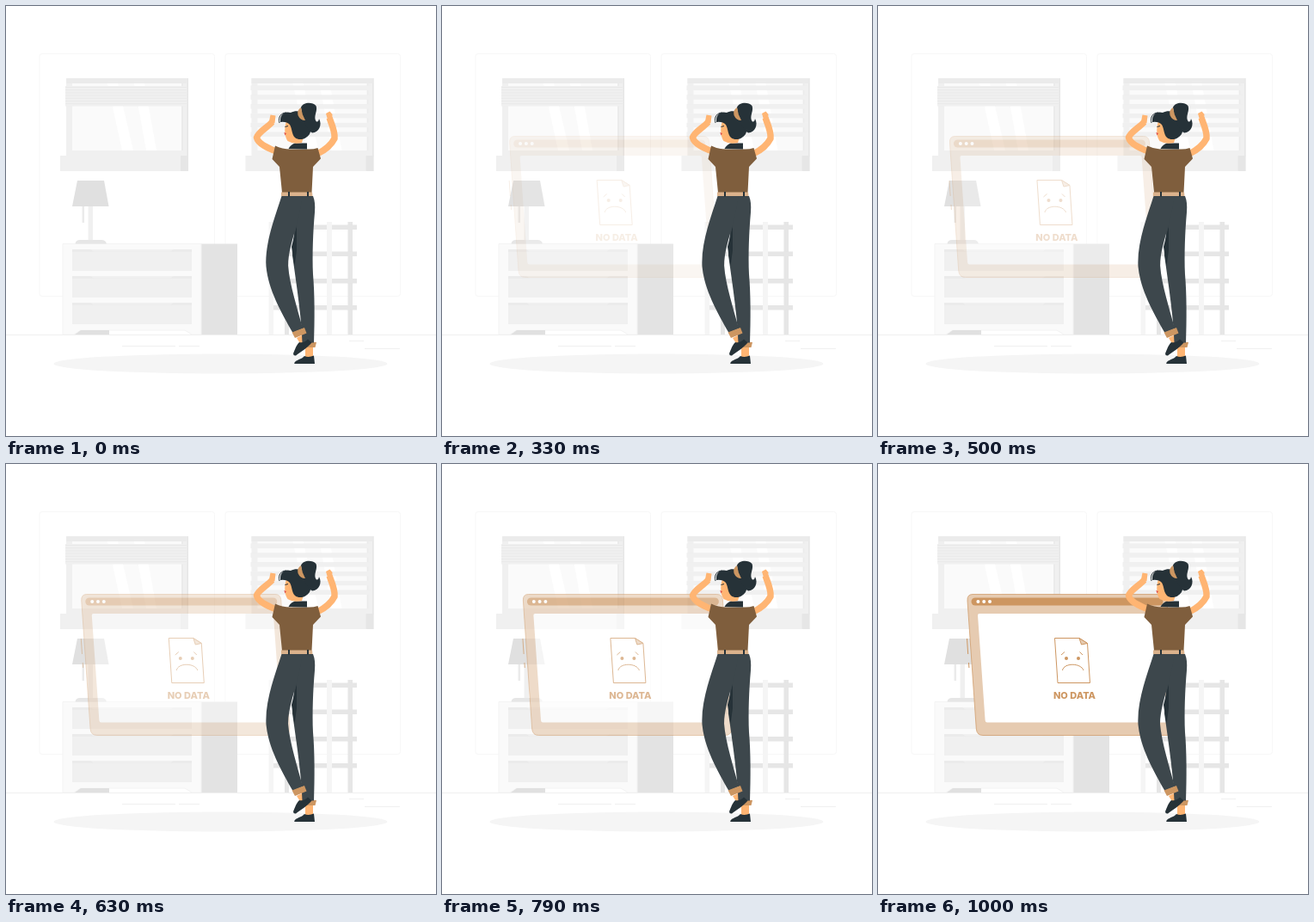
An HTML page that plays this animation: 500 px wide and 500 px high, repeating every 1040 ms.

```html
<!DOCTYPE html>
<html lang="en">
<head>
<meta charset="utf-8">
<title>No data</title>
<style>
  html, body { margin: 0; width: 100%; height: 100%; overflow: hidden; background: #fff; }
  svg { display: block; width: 100vw; height: 100vh; }
  .label { font: 800 11px Inter, "DejaVu Sans", sans-serif; }
</style>
</head>
<body>
<svg viewBox="0 0 500 500">
  <defs>
    <g id="window">
      <path fill="#f0f0f0" d="M70 84H212V192H70z"/>
      <path fill="#e6e6e6" d="M210.500 84H212V175H210.500z"/>
      <path fill="#ebebeb" d="M70 84H211V90H70zM204 90H206V168H204z"/>
      <path fill="#fafafa" d="M77 90H204V168H77z"/>
      <path fill="#fff" d="M118 90H130L148 168H135zM149 90H161L175 168H163z"/>
      <path fill="#f0f0f0" d="M63 174H203V192H63z"/>
      <path fill="#e6e6e6" d="M203 174H212V192H203z"/>
    </g>
    <g id="drawer">
      <path fill="#f0f0f0" d="M77 283H216V308H77z"/>
      <path fill="#ebebeb" d="M77 283H98L102 285.500H191L195 283H216V286H77z"/>
    </g>
  </defs>

  <g fill="none" stroke="#f7f7f7">
    <rect x="39" y="55.500" width="203.500" height="282" rx="3"/>
    <rect x="255" y="55.500" width="203.500" height="282" rx="3"/>
    <path stroke="#f0f0f0" d="M0 382.500H500M135 395.500H197M201 395.500H225M399 389.500H416M417 398.500H458"/>
  </g>

  <use href="#window"/>
  <use href="#window" x="215.500"/>
  <g id="blinds"></g>

  <g id="shelf">
    <path fill="#e6e6e6" d="M397.500 251H403V382H397.500zM324 251H329V382H324z"/>
    <path fill="#e6e6e6" d="M306 254.500H408V260H306zM306 285.500H408V291H306zM306 317H408V322.500H306zM306 348H408V353.500H306z"/>
    <path fill="#f5f5f5" d="M373 251H379V382H373zM305.500 251H311V382H305.500z"/>
  </g>

  <g id="dresser">
    <path fill="#e3e3e3" d="M227 276.500H269V382H227z"/>
    <path fill="#fafafa" stroke="#f3f3f3" d="M66 276.500H227V382H216L208 377H87L79 382H66z"/>
    <path fill="#e0e0e0" d="M80 382L87 377H120V382z"/>
    <use href="#drawer"/>
    <use href="#drawer" y="31"/>
    <use href="#drawer" y="62"/>
  </g>

  <g id="lamp">
    <path fill="#f0f0f0" d="M95.500 232H101V274H95.500z"/>
    <path fill="#ebebeb" d="M88.500 232H91V252H88.500z"/>
    <path fill="#e0e0e0" d="M83 203H114L119.500 233H77z"/>
    <path fill="#e6e6e6" d="M80.500 276.500Q81 272 86 272H111Q116 272 117 276.500z"/>
  </g>

  <ellipse cx="249.500" cy="416" rx="194" ry="11.500" fill="#f5f5f5"/>

  <g id="screen" fill="none" stroke="#cd9661">
    <path fill="#e6cbb1" stroke-width=".7" d="M110 151.500H329Q335.500 151.500 336 158L346 307Q346.500 315.500 339 315.500H122Q115 315.500 114.300 308L104 159Q103.500 151.500 110 151.500z"/>
    <path fill="#fff" stroke="none" d="M118 174H325Q327 174 327.200 176L336 298Q336 300.500 334 300.500H127Q124.800 300.500 124.600 298L116 176Q115.800 174 118 174z"/>
    <rect x="108.500" y="155.500" width="223" height="9" rx="4.500" fill="#cd9661" stroke="none"/>
    <g fill="#fff" stroke="none">
      <circle cx="116.400" cy="160" r="2"/>
      <circle cx="123.200" cy="160" r="2"/>
      <circle cx="130" cy="160" r="2"/>
    </g>
    <path d="M103.500 203L104.700 221M105.500 231L105.900 237"/>
    <path d="M205.500 202.500H234L243.500 208.500L246.500 254.500H209z"/>
    <path fill="#e6cbb1" d="M234 202.500L236.500 210L243.500 208.500z"/>
    <path d="M213 222L217 218.500M234.500 218.500L238 222M214.500 240C216 231 236 231 239 240"/>
    <g fill="#cd9661" stroke="none">
      <circle cx="219" cy="226" r="2"/>
      <circle cx="233" cy="226" r="2"/>
      <text class="label" x="228.500" y="272.800" text-anchor="middle">NO DATA</text>
    </g>
  </g>

  <g id="woman">
    <!-- legs and shoes -->
    <path fill="#ffb573" d="M348 396H357V409H348zM338 386L346 382L350 390L343 394z"/>
    <path fill="#cd9661" d="M345 390L361 391L359.500 397H347z"/>
    <path fill="#263238" d="M335 415.500C337 411 344 411 347 407Q352 409 358 406.500L359 416H336z"/>
    <path fill="#3d474c" d="M338 221H357Q360 228 359 240C357 262 356 290 357 312C359 335 359 365 358 391.500H344.500C344 365 338 325 333 290z"/>
    <path fill="#263238" d="M338 256L332 280L335.500 303L338 284z"/>
    <path fill="#3d474c" d="M320.500 221H345L339 252C333 271 328 288 328 302C330 325 339 352 345 375L333.500 380C320 356 305 330 302.500 303C301 275 313 245 320.500 221z"/>
    <path fill="#cd9661" d="M332.500 379.500L347 374L349.500 380.500L336 386z"/>
    <path fill="#263238" d="M334 404C336 400 337 395 341 391Q347 392 351 387.500L355.500 391.500C351 397 343 402 337 406.500Q334 407 334 404z"/>

    <!-- arms -->
    <g fill="none" stroke="#ffb573" stroke-width="7.500" stroke-linejoin="round">
      <path d="M309.500 135C303 142 293 147 291.500 153C293 160 304 165 314 169"/>
      <path d="M376 130C379 138 383 147 382 154C378 162 370 168 362 172"/>
    </g>
    <path fill="#ffb573" d="M307.500 126.500L313.500 127.500L312.500 136L307 139L306 134zM372 125L376.500 122.500L379.500 126L379 134L374.500 134z"/>

    <!-- torso -->
    <path fill="#7f5e3d" d="M313 162.500Q321 166.500 331 166.500H350Q357 167 362.500 165L366 177.500L357 187L355.500 217H321L318 187L309.500 178z"/>
    <path fill="#dbb28c" d="M320 216.500H356L356.500 221H320z"/>
    <path fill="#263238" d="M328 216H330V221.500H328zM350 216H352V221.500H350z"/>

    <!-- head -->
    <path fill="#263238" d="M328.500 166Q331 161 336 159.500H350V166.500z"/>
    <path fill="#ffb573" d="M326 134C323 143 324 152 327.500 157Q334 161 344 159L350 140L338 130z"/>
    <path fill="#e04f4a" d="M323.300 147L326 148L324.500 150.500z"/>
    <path fill="none" stroke="#263238" d="M324.500 140.500L328 139.500M318 136C316 129 320 124 326 124"/>
    <path fill="#263238" d="M319 133C319 125 325 122 331 124C337 121 343 122 346 126C354 130 358 139 353 149C349 155 341 157 336 153C332 149 333 143 330 138Q326 134 319 135z"/>
    <path fill="#263238" d="M343 118C345 112 356 111 360.500 116C363 122 357 128 360.500 134Q363 136 364 131C368 138 364 147 356 147.500C350 145 345 132 343 118z"/>
    <path fill="#cd9661" d="M343 118Q338 121 339.500 127Q342 133 348 133Q344 126 343 118z"/>
  </g>
</svg>

<script>
  const LOOP = 1040, RATE = 24, SLIDE = 30;
  const screenGroup = document.getElementById("screen");
  const blinds = document.getElementById("blinds");

  function slat(x, y, height, fill) {
    const rect = document.createElementNS("http://www.w3.org/2000/svg", "rect");
    const attrs = { x, y, width: 141, height, fill };
    for (const name in attrs) rect.setAttribute(name, attrs[name]);
    blinds.append(rect);
  }

  slat(69, 93, 23.5, "#f0f0f0");
  for (let i = 0; i < 7; i++) slat(69, 94 + i * 3.2, 1, "#e9e9e9");
  for (let i = 0; i < 6; i++) slat(284.500, 92.500 + i * 10.8, 5.5, "#f0f0f0");

  // Ease-in, cubic-bezier(.42, 0, 1, 1), solved by bisection.
  function easeIn(x) {
    let low = 0, high = 1;
    for (let i = 0; i < 24; i++) {
      const s = (low + high) / 2;
      const bx = 1.26 * s * (1 - s) ** 2 + 3 * s * s * (1 - s) + s ** 3;
      if (bx < x) low = s; else high = s;
    }
    const s = (low + high) / 2;
    return 3 * s * s * (1 - s) + s ** 3;
  }

  function draw(ms) {
    // The small lead absorbs rounding of the 24 steps per second to 10 ms.
    const step = Math.floor((ms % LOOP + 3.4) * RATE / 1000);
    const progress = step < 4 ? 0 : easeIn(Math.min(step / RATE, 1));
    screenGroup.setAttribute("opacity", progress);
    screenGroup.setAttribute("transform", `translate(${SLIDE * (progress - 1)} 0)`);
  }

  const start = performance.now();
  function tick() {
    draw(performance.now() - start);
    requestAnimationFrame(tick);
  }
  tick();
</script>
</body>
</html>
```
